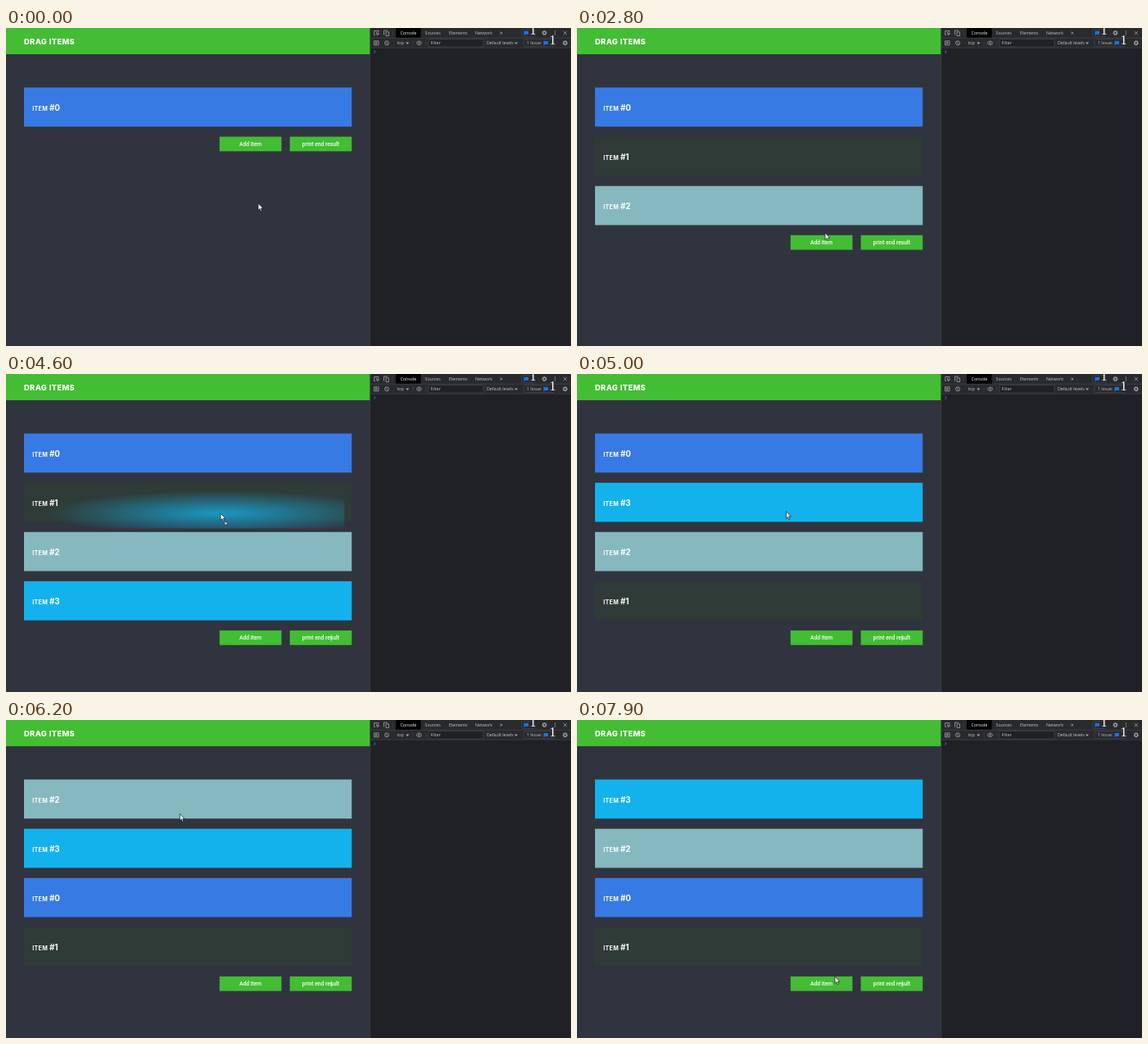
An HTML page for the animation above (8 s loop, 690 by 388 pixels).

```html
<!DOCTYPE html>
<html lang="en">
<head>
<meta charset="utf-8">
<title>Drag items</title>
<style>
  html, body { margin: 0; width: 100%; height: 100%; overflow: hidden; background: #30343f; }
  svg { display: block; }
  text { fill: #fff; white-space: pre; }
  .title { font: 800 9.3px Inter, sans-serif; letter-spacing: .4px; }
  .label { font: 700 7px Inter, sans-serif; letter-spacing: .35px; }
  .label .num { font-size: 9.8px; letter-spacing: 0; }
  .button { font: 500 6.7px Roboto, sans-serif; text-anchor: middle; }
  #tools text { font: 5.25px "Open Sans", sans-serif; fill: #c3c7cc; }
  #tools .on { fill: #fff; }
  .line { fill: none; stroke: #494c50; stroke-width: .6; }
  .icon { fill: none; stroke: #a4a8ad; stroke-width: .8; }
</style>
</head>
<body>
<svg width="690" height="388" viewBox="0 0 690 388">
  <defs>
    <radialGradient id="fade">
      <stop offset="0" stop-color="#fff" stop-opacity=".78"/>
      <stop offset="1" stop-color="#fff" stop-opacity="0"/>
    </radialGradient>
    <g id="gear"><circle r="2.2" stroke-width="1.5" stroke-dasharray="1.25 .48"/><circle r="1.6"/></g>
    <g id="issue">
      <path d="M0 0h5.5v4H1.8L0 5.5z" fill="#1a73e8"/>
      <text x="7" y="4.2">1</text>
    </g>
  </defs>
  <rect width="445" height="388" fill="#30343f"/>
  <rect width="445" height="32" fill="#43bd33"/>
  <text class="title" x="22" y="19.7">DRAG ITEMS</text>
  <g id="stage"></g>

  <g id="tools">
    <rect x="444.5" width="245.5" height="388" fill="#202124"/>
    <rect x="445" width="245" height="24" fill="#292a2d"/>
    <rect x="476" width="30.5" height="12" fill="#000"/>
    <rect x="516" y="13.7" width="67" height="9.3" fill="#202124"/>
    <g class="line">
      <path d="M444.8 0V388M445 12.2H690M445 24.2H690M472 3v6.5M497 15.5v6M513 15.5v6"/>
      <rect x="516" y="13.7" width="67" height="9.3"/>
      <rect x="629.5" y="1.6" width="16" height="8.8" rx="1"/>
      <rect x="632" y="13.8" width="37" height="8.8" rx="1"/>
    </g>
    <text class="on" x="481.5" y="8">Console</text>
    <text x="511.5" y="8">Sources</text>
    <text x="541" y="8">Elements</text>
    <text x="573" y="8">Network</text>
    <text x="603" y="8" style="font-size:7px">»</text>
    <text x="477.5" y="20">top</text>
    <text x="518.5" y="20.3">Filter</text>
    <text x="587" y="20">Default levels</text>
    <text x="636" y="20">1 Issue:</text>
    <use href="#issue" x="632.5" y="3.7"/>
    <use href="#issue" x="656.5" y="15.9"/>
    <path d="M488.3 17.5h4l-2 2.4zM621 17.5h4l-2 2.4z" fill="#a4a8ad"/>
    <g class="icon">
      <path d="M451 8.5H449.7V3.5H455V5M452.3 5.5l3.4 1.3-1.5.6-.6 1.6z"/>
      <path d="M461.5 8.5V3H466M464 4.8h3.5V9.5H464z"/>
      <path d="M449.5 15.8h5.5v5h-5.5zM451.5 17l2 1.3-2 1.3z"/>
      <circle cx="465" cy="18.3" r="2.5"/><path d="M463.2 16.5l3.6 3.6"/>
      <path d="M501 18.3q3.5-4.6 7 0q-3.5 4.6-7 0z"/><circle cx="504.5" cy="18.3" r=".9"/>
      <use href="#gear" x="657.5" y="6"/>
      <use href="#gear" x="682.8" y="18.3"/>
      <path d="M670.5 3.5v5" stroke-width="1.2" stroke-dasharray="1.1 .9"/>
      <path d="M680.7 4l4.2 4.2M684.9 4l-4.2 4.2"/>
    </g>
    <path d="M449.3 27.3l1.9 1.7-1.9 1.7" fill="none" stroke="#3f70e8" stroke-width=".9"/>
  </g>
  <g id="pointer"></g>
</svg>

<script>
const LOOP = 8000, STEP = 100, REST = 100;
const PITCH = 60.1, CARD_HEIGHT = 47.7;
const colors = ['#387ae4', '#2f3b36', '#86b8bf', '#14b2ec'];
const stage = document.getElementById('stage');
const pointer = document.getElementById('pointer');

const slotY = slot => 72.6 + slot * PITCH;
const buttonY = count => slotY(count) - 0.1;

// The pointer reaches each stop REST ms early, then acts there at the given time.
const move = (at, x, y) => ({ at, x, y });
const add = (at, count) => ({ at, x: 303, y: buttonY(count) + 9, add: true });
const drop = (at, x, y, from, to) => ({ at, x, y, from, to });

const stops = [
  move(0, 308, 214),
  move(1000, 303, 142), add(1200, 1), move(1800, 303, 142), add(2300, 2), add(3100, 3),
  move(4200, 271, 282), drop(4800, 261, 157, 3, 1),
  move(5600, 233, 211), drop(5900, 225, 93, 2, 0),
  move(6800, 185, 161), drop(7200, 183, 110, 1, 0),
  move(7500, 216, 192), move(LOOP, 315, 313),
];
const firstGrab = stops[stops.findIndex(s => 'to' in s) - 1].at;

const ease = k => k * k * (3 - 2 * k);

function orderAt(t) {
  const order = [0];
  for (const { at, add, from, to } of stops) {
    if (at > t) break;
    if (add) order.push(order.length);
    if (to !== undefined) [order[from], order[to]] = [order[to], order[from]];
  }
  return order;
}

const card = (id, y) => `<g transform="translate(22 ${y})">
  <rect width="400.2" height="${CARD_HEIGHT}" fill="${colors[id]}"/>
  <text class="label" x="10.2" y="28">ITEM <tspan class="num">#${id}</tspan></text></g>`;

const button = (x, y, label) => `<rect x="${x}" y="${y}" width="75.6" height="17.8" fill="#43bd33"/>
  <text class="button" x="${x + 37.8}" y="${y + 11.4}">${label}</text>`;

// The dragged copy shows only in a soft ellipse around the pointer.
const ghost = (id, slot, grab, x, y) => `
  <mask id="glow" maskUnits="userSpaceOnUse" x="0" y="0" width="445" height="388">
    <ellipse cx="${x}" cy="${y}" rx="215" ry="28" fill="url(#fade)"/>
  </mask>
  <g mask="url(#glow)"><g transform="translate(${x - grab.x} ${y - grab.y})">${card(id, slotY(slot))}</g></g>`;

const arrow = '<path d="M0 0V8.3L1.9 6.6 3.3 9.6 4.6 9 3.3 6.1H5.8Z" fill="#fff" stroke="#15171c" stroke-width=".7"/>';
const moveBadge = '<rect x="4.8" y="10.7" width="3.2" height="3.2" fill="#d5d8dc" stroke="#333" stroke-width=".7"/>';
const refused = `<circle r="4" fill="#fff"/>
  <g fill="none" stroke="#d0161c" stroke-width="1.4"><circle r="3.3"/><path d="M-2.3-2.3L2.3 2.3"/></g>`;

function draw(t) {
  const order = orderAt(t);
  const i = stops.findIndex(s => s.at > t);
  const last = stops[i - 1], next = stops[i];
  const k = ease(Math.min(1, (t - last.at) / (next.at - REST - last.at)));
  const x = last.x + (next.x - last.x) * k;
  const y = last.y + (next.y - last.y) * k;
  const dragging = 'to' in next && t > last.at;
  const top = buttonY(order.length);

  stage.innerHTML = order.map((id, slot) => card(id, slotY(slot))).join('')
    + button(260.8, top, 'Add Item') + button(346.6, top, 'print end result')
    + (t > firstGrab ? `<path d="M397.2 ${top + 5.5}v7.5" stroke="#e6f3e4" stroke-width=".8"/>` : '')
    + (dragging ? ghost(order[next.from], next.from, last, x, y) : '');

  const overTarget = dragging && y < slotY(next.to) + CARD_HEIGHT;
  pointer.setAttribute('transform', `translate(${x} ${y})`);
  pointer.innerHTML = !dragging ? arrow : overTarget ? arrow + moveBadge : refused;
}

let shown = -1;
const start = performance.now();
function tick() {
  const t = Math.floor((performance.now() - start) % LOOP / STEP) * STEP;
  if (t !== shown) draw(shown = t);
  requestAnimationFrame(tick);
}
tick();
</script>
</body>
</html>
```
